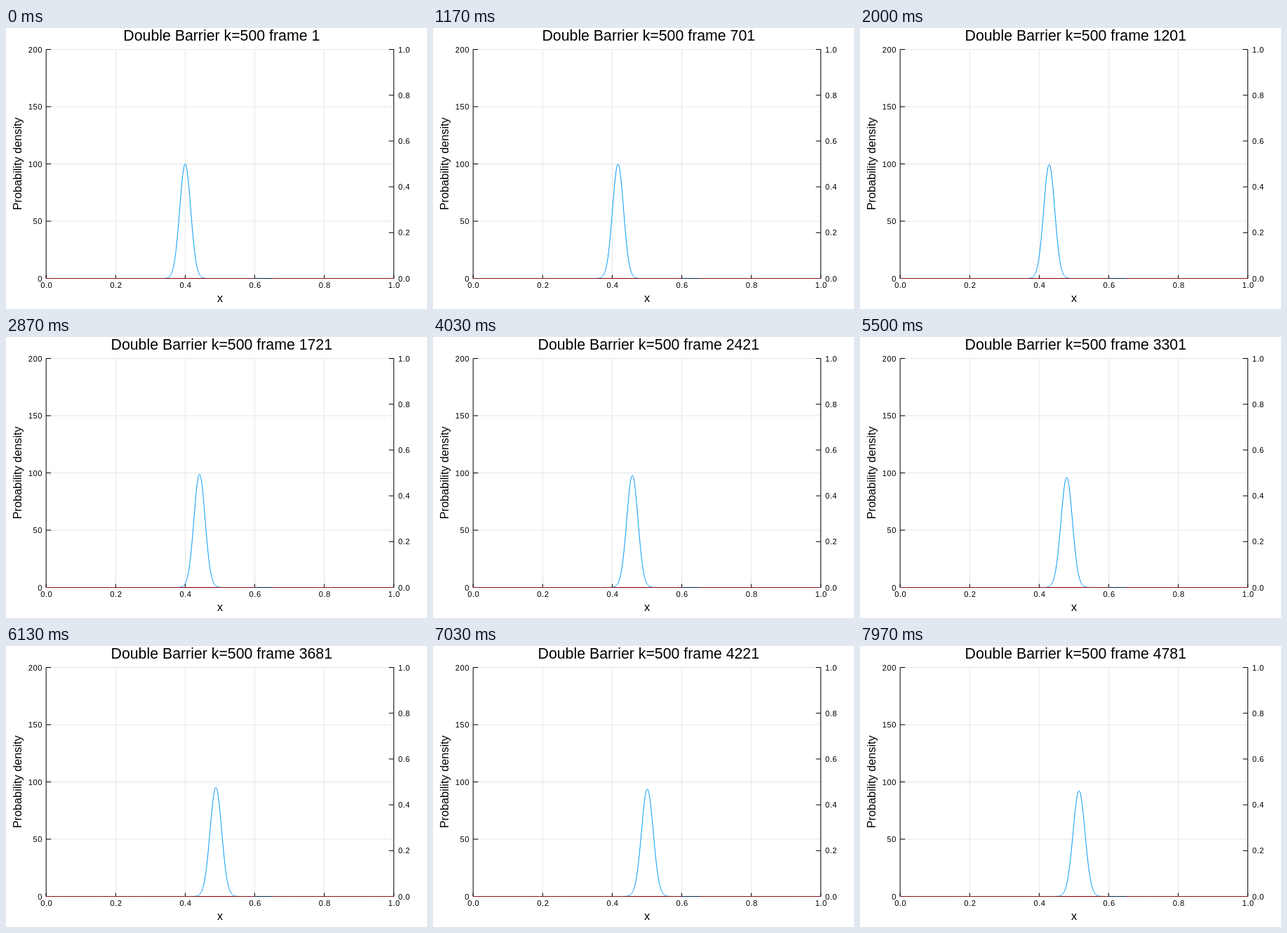
Recreate the animation shown at these times as an HTML page. Size 600 px wide and 400 px high, loop 8000 ms.

```html
<!DOCTYPE html>
<html lang="en">
<head>
<meta charset="utf-8">
<title>Double Barrier</title>
<style>
  html, body { margin: 0; width: 100%; height: 100%; overflow: hidden; background: #fff; }
  svg { display: block; width: 600px; height: 400px; }
  text { font-family: "Liberation Sans", Arial, sans-serif; fill: #000; }
  .title { font-size: 21.3px; }
  .guide { font-size: 16.3px; }
  .tick { font-size: 11.2px; letter-spacing: .5px; }
  path { fill: none; stroke-width: 1; }
</style>
</head>
<body>
<svg id="plot" viewBox="0 0 600 400"></svg>
<script>
const LOOP = 8000, STEPS = 240;
const LEFT = 57.2, RIGHT = 552.7, TOP = 30.5, BOTTOM = 356.5;
const plot = document.getElementById('plot');

const px = x => LEFT + x * (RIGHT - LEFT);
const py = fraction => BOTTOM - fraction * (BOTTOM - TOP);

function add(tag, attrs, content = '') {
  const el = document.createElementNS('http://www.w3.org/2000/svg', tag);
  for (const name in attrs) el.setAttribute(name, attrs[name]);
  el.textContent = content;
  return plot.appendChild(el);
}
const line = (d, stroke, opacity = 1) => add('path', { d, stroke, opacity });
const label = (kind, x, y, anchor, content) =>
  add('text', { class: kind, x, y, 'text-anchor': anchor }, content);

// Grid
for (let i = 1; i <= 4; i++) {
  line(`M${px(i / 5)} ${TOP}V${BOTTOM}`, '#e5e5e5');
  line(`M${LEFT} ${py(i / 4)}H${RIGHT}`, '#e5e5e5');
}

// Axes, ticks and labels
line(`M${LEFT} ${TOP}V${BOTTOM}H${RIGHT}V${TOP}`, '#000');
for (let i = 0; i <= 5; i++) {
  const x = px(i / 5), y = py(i / 5), value = (i / 5).toFixed(1);
  line(`M${x} ${BOTTOM}v-5M${RIGHT} ${y}h-7`, '#000');
  label('tick', x + .6, 370.3, 'middle', value);
  label('tick', 559, y + 4.1, 'start', value);
}
for (let i = 0; i <= 4; i++) {
  const y = py(i / 4);
  line(`M${LEFT} ${y}h7`, '#000');
  label('tick', 52, y + 4.1, 'end', i * 50);
}
label('guide', 305, 390, 'middle', 'x');
label('guide', 0, 0, 'middle', 'Probability density')
  .setAttribute('transform', 'translate(22 193.3) rotate(-90)');

const title = label('title', 307.3, 18.2, 'middle', '');
const curve = line('', '#009af9');

// The second axis and the potential, with its barrier gap, lie over the curve
line(`M${LEFT} ${BOTTOM}H${RIGHT}`, '#000', .6);
line(`M${LEFT} ${BOTTOM}H${px(.6)}M${px(.65)} ${BOTTOM}H${RIGHT}`, '#f00', .55);

// Spreading Gaussian packet on a lattice of spacing 0.001
function packet(step) {
  const center = .4 + step * 1e-6 * Math.sin(.5) / .001;
  const spread = 1 + (step * 1e-6 * Math.cos(.5) / 5e-4) ** 2;
  const points = [];
  for (let i = 0; i <= 1000; i++) {
    const x = i / 1000;
    const density = 100 / Math.sqrt(spread) * Math.exp(-2000 * (x - center) ** 2 / spread);
    points.push(px(x).toFixed(2) + ' ' + py(density / 200).toFixed(2));
  }
  return 'M' + points.join('L');
}

// Each step starts on a whole hundredth of a second
const startOf = step => Math.round(step * LOOP / STEPS / 10) * 10;
function stepAt(time) {
  const step = Math.min(STEPS - 1, Math.floor(time * STEPS / LOOP + .5));
  return startOf(step) > time ? step - 1 : step;
}

let shown = -1;
function draw(time) {
  const step = stepAt(time % LOOP);
  if (step === shown) return;
  shown = step;
  title.textContent = `Double Barrier k=500 frame ${step * 20 + 1}`;
  curve.setAttribute('d', packet(step));
}

const begin = performance.now();
function tick() {
  draw(performance.now() - begin);
  requestAnimationFrame(tick);
}
tick();
</script>
</body>
</html>
```
